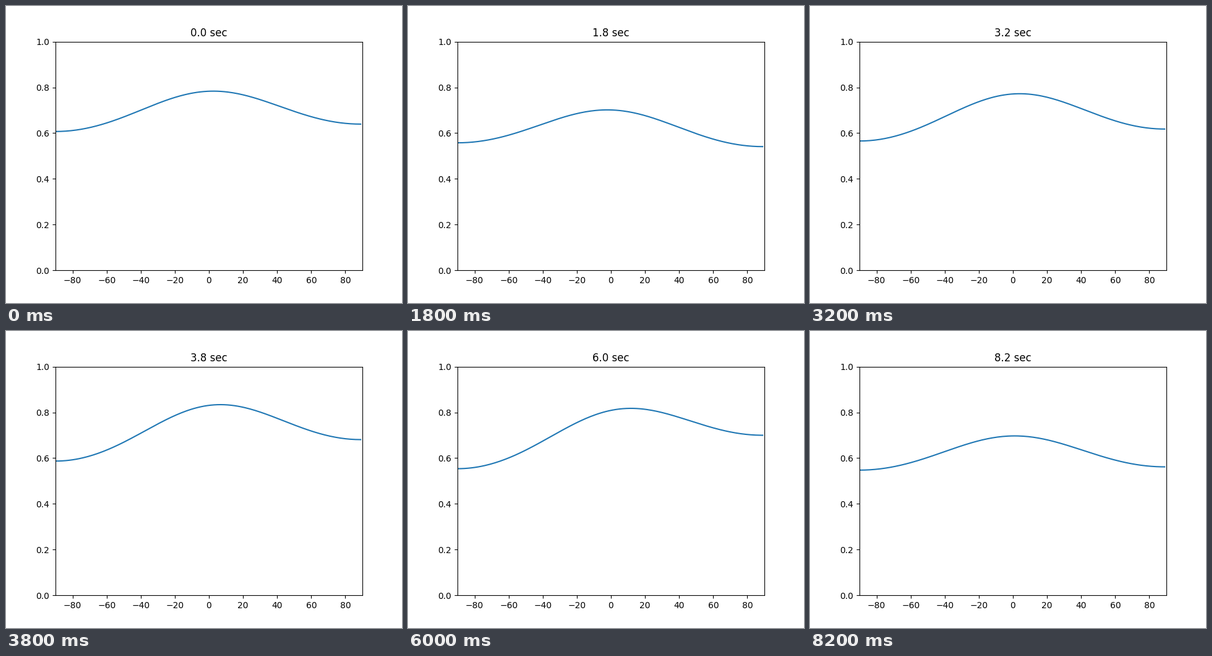
Recreate the animation shown at these times as a matplotlib script. Size 640 px wide and 480 px high, loop 8.4 s.

```python
import numpy as np
import matplotlib.pyplot as plt
from matplotlib.animation import FuncAnimation

FRAMES, INTERVAL = 42, 200
LOOP = FRAMES * INTERVAL / 1000

# centre level of the curve at a few moments
TIMES = [0, 1, 2.4, 2.8, 3.2, 4.6, 6, 8.2]
LEVELS = [0.783, 0.730, 0.680, 0.635, 0.771, 0.909, 0.808, 0.697]

# 180 steering angles from end to end, drawn against whole degrees
degrees = np.arange(-90, 90)
s = np.sin(np.linspace(-np.pi / 2, np.pi / 2, len(degrees)))
drop = (1 - np.cos(1.3 * s)) / (1 - np.cos(1.3))
slant = np.sin(1.1 * s) / np.sin(1.1)


def wave(t, mean, swing, peak, period):
    return mean + swing * np.cos(2 * np.pi * (t - peak) / period)


def response(t):
    level = np.interp(t, TIMES, LEVELS)
    depth = level * wave(t, 0.2205, 0.0165, LOOP / 2, LOOP)
    tilt = wave(t, 0.034, 0.044, 5.4, 7.9)
    return level - depth * drop + tilt * slant


fig, ax = plt.subplots(figsize=(6.4, 4.8), dpi=100)
ax.set_xlim(-90, 90)
ax.set_ylim(0, 1)
line, = ax.plot(degrees, response(0))
title = ax.set_title("0.0 sec")


def update(i):
    t = i * INTERVAL / 1000
    line.set_ydata(response(t))
    title.set_text(f"{t:.1f} sec")
    return line, title


anim = FuncAnimation(fig, update, frames=FRAMES, interval=INTERVAL,
                     repeat=True, repeat_delay=0, blit=False)
plt.show()
```
